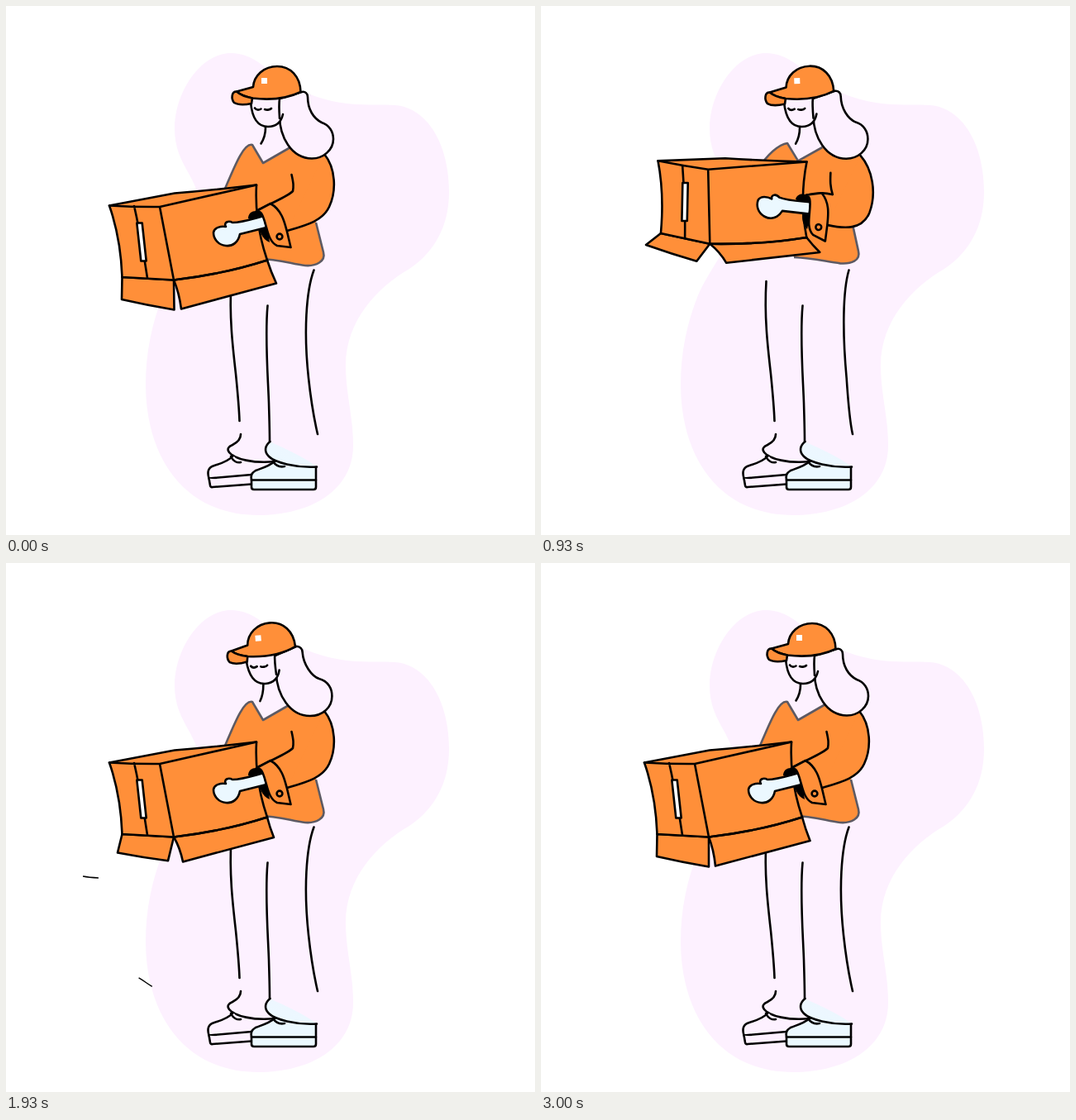
Animation, 640 px wide and 640 px high, one loop 3070 ms. Source, as an HTML page:

```html
<!DOCTYPE html>
<html lang="en">
<head>
<meta charset="utf-8">
<title>Carrying a box</title>
<style>
html, body { margin: 0; width: 100%; height: 100%; overflow: hidden; background: #fff; }
svg { display: block; width: 100vw; height: 100vh; }
.ink { stroke: #000; stroke-width: 2.6; stroke-linecap: round; stroke-linejoin: round; fill: none; }
.orange { fill: #ff8f39; }
.lilac { fill: #fdf1ff; }
.ice { fill: #ebf8ff; }
.gray { stroke: #5d5a63; stroke-linecap: butt; }
.wind { stroke: #000; stroke-width: 1.4; fill: none; }
</style>
</head>
<body>
<svg viewBox="0 0 640 640">
  <defs>
    <linearGradient id="hemTone" x1="0" y1="1" x2=".6" y2="0">
      <stop offset=".2" stop-color="#ebf8ff"/><stop offset="1" stop-color="#eef6ff"/>
    </linearGradient>
  </defs>
  <path class="lilac" d="M272 57C300 57 316 78 333 89C355 103 385 117 425 119C445 120 455 119 470 120C508 122 536 165 536 225C536 270 515 300 488 318C450 340 411 380 411 435C411 470 420 495 420 532C420 585 370 616 305 616C215 616 169 545 169 458C169 420 176 385 190 350C205 315 235 285 235 250C235 205 204 195 204 148C204 105 235 57 272 57Z"/>

  <g class="ink">
    <path d="M272.5 333C270 375 274 410 278 445C280.5 470 282 487 282.5 502"/>
    <path d="M316.5 362.5C313 400 317 450 318 480C318.6 500 319 515 319 527"/>
    <path id="leg"/>
    <path d="M284 518C284 524 280 528 274 531C269 533 267 536 270 540C276 548 300 554 326 551"/>
    <path class="lilac" d="M275 544C270 550 262 553 252 556C245 558 243 563 245.500 571.500L297 567"/>
    <path class="lilac" d="M245.500 571.500L247 580Q247.500 582.500 250 582L297 578.500"/>
    <path d="M272 545C275 551 280 553 284 552"/>
    <path fill="url(#hemTone)" stroke="none" d="M319.500 527C313 532 312 539 318 545C325 552 350 559 376 557.500C360 545 338 536 319.500 527Z"/>
    <path class="ice" d="M325 551C318 557 310 559 302 562C297 565 296 568 297 574L375 573.500V558C355 559 338 555 325 551" stroke="none"/>
    <path d="M325 551C318 557 310 559 302 562C297 565 296 568 297 573.500M375 573.500V558"/>
    <path d="M319.500 527C313 532 312 539 318 545C325 552 350 559 376 557.500"/>
    <path class="ice" d="M297 573.500V582Q297 585 300 585H372Q375 585 375 582V573.500Z"/>
    <path d="M323 551C327 557 332 558 337 557"/>
  </g>

  <path id="shirt" class="orange"/>
  <path id="collar" class="ink gray"/>
  <path id="side" class="ink gray"/>
  <path id="neck" class="ink"/>
  <path id="arm" class="ink orange"/>
  <path id="crease" class="ink"/>

  <g class="ink orange">
    <path id="leftFlap"/>
    <path id="rightFlap"/>
    <path id="box"/>
    <path id="edges" fill="none"/>
    <path id="slot" fill="#fff"/>
  </g>

  <g id="forearm" class="ink">
    <path d="M293 257C293 248 303 245 310 251C316 259 317 274 319 286C309 282 307 272 305 262Z" fill="#000" stroke="none"/>
    <path class="ice" d="M266 267C263 262 269 259 274 262C286 262 300 257 312 254L315 268L283 276C281 286 274 291 266 290C256 289 251 281 251 274C252 268 260 266 266 267Z"/>
    <path class="orange" d="M303 248L320 239C334 247 337 262 340 273L344.500 292L328 290C315 284 316 262 309 251Q307 248 303 248Z"/>
    <circle cx="331" cy="279" r="3.400"/>
  </g>

  <path id="hair" class="ink lilac"/>
  <g id="head" class="ink">
    <path class="lilac" d="M296 116C297 128 301 146 317 146C327 146 333 140 335 131" />
    <path d="M331 112C330 119 330.500 128 331 136"/>
    <path d="M301 123.500C303 126 306 126 308.500 124.500M313 125C315 126 319 126 321 124"/>
    <path class="orange" d="M279 103.500L299 98C300 84 312 73 328 73C344 73 356 85 356.500 104C340 112 318 114 298 111.500C290 110 284 108 279 103.500Z"/>
    <path class="orange" d="M279 103.500C273 103 272 112 276 117C281 120 290 119.500 297 118L298 111.500C290 110 284 108 279 103.500Z"/>
    <rect x="309" y="87" width="7" height="7" fill="#fff" stroke="none"/>
  </g>

  <path class="wind" d="M158 383C130 370 110 372 83 366" data-start="1115" data-speed=".25"/>
  <path class="wind" d="M172 400L149 388C125 377 105 385 79 375" data-start="1410" data-speed=".16"/>
  <path class="wind" d="M217 513C205 523 190 522 170 508S145 496 134 503S90 514 58 508" data-start="1532" data-speed=".157"/>
</svg>
<script>
const LOOP = 3070, FRAME = 1000 / 14, STREAK = 19;
const $ = id => document.getElementById(id);
const draw = (id, d) => $(id).setAttribute('d', d);
const lerp = (a, b, f) => a + (b - a) * f;

// Carrying poses, from lowest to highest.
const legs = [
  'M372.5 319.5C363 345 360 395 366 450C369 478 374 505 377 518',
  'M372.5 319.5C363 345 360 395 366 450C369 478 374 505 377 518',
  'M372.5 319.5C365 345 364 395 369 450C371 480 374 505 377 518',
  'M372.5 319.5C365 345 365 395 370 450C372 480 374 505 377 518'
];
const collars = [
  'M262 228C275 198 287 165 298 168L311 190L344 171',
  'M262 228C275 198 287 165 298 168L311 190L344 171',
  'M262 198C272 178 288 168 298 166L311 188L341 171',
  'M264 196C274 181 288 167 298 166L311 187L340 171'
];
const sides = [
  'M375 262L384 298C387 309 375 315 362 314C345 312 330 306 306 306',
  'M375 262L384 298C387 309 375 315 362 314C345 312 330 306 306 306',
  'M375 260L384 296C387 308 375 313 362 312C345 310 330 305 306 304',
  'M379 271L384 297C387 308 375 312 362 311C345 309 330 305 306 304'
];
const arms = [
  'M385 179C399 196 400 224 391 243C383 260 364 265 340 272',
  'M389 178C404 194 406 222 395 244C386 262 366 261 343 267',
  'M391 177C406 194 409 222 398 243C388 262 366 258 346 261',
  'M384 183C398 199 405 228 397 254C389 276 368 276 346 267'
];
const creases = [
  'M345.5 204C348 215 348 218 347 224C341 230 330 234 303 248',
  'M347 201C349 212 349 216 348 220C342 228 328 230 307 238',
  'M351 196C351.5 209 351 214 347 221C340 224 330 222 313 229',
  'M350 205C349 213 349 220 356 232C350 228 345 226 321 230'
];
// Corners: A back left, B back middle, C right, D front, E seam top,
// F bottom left, G bottom front, H bottom right, I seam bottom.
const corners = [
  '125 241.5 204 226.5 303 216.5 186 243 155 242 140.5 328 203 331.5 316 307.5 171 329',
  '130 220.5 210 209 309 204.5 191.5 225 160 222.5 141.5 307.5 203.5 314 317.5 296 171.5 310.5',
  '136 199 217 192 316 192 197 206.5 166 204 143 287 203 296.5 320 283.5 172.5 291',
  '144.5 181 226 180 324.5 186.5 205 193 174 187.5 146 268.5 205 283 322 278 175 275'
];
const slots = ['164 285.5 5', '167 266.5 4', '170.5 247 1', '176 231.5 -2'];
const grips = ['267 277 0', '270 263 7', '274 249 12.5', '278 240 25'];
const hairs = [
  'M331 112L358 104C362 103 365 106 365 110C365 125 372 136 382 141C391 144 396 152 396 161C396 174 384 184.5 370 184.5C345 184 331 158 331 133',
  'M326 112L352 101C356 101 359 104 359 108C360 123 370 137 379 140C390 143 394.5 152 394.5 161C394.5 175 383 185 368 185C344 185 328 160 327 133'
];
const necks = ['M314 147C314 155 312 161 308.5 166.5', 'M311.5 147C311.5 155 310 162 307.5 167'];

// Keys are [time, ...values].
const liftKeys = [[0, 0], [360, 1], [710, 2], [1140, 3], [1540, 0], [LOOP, 0]];
const headKeys = [[0, 0], [360, .3], [710, -.8], [1140, -2.4], [1570, -4.1], [1850, -4.4], [2290, -3.3], [3000, 0], [LOOP, 0]];
const flapKeys = [
  [0, -.5, 27, .5, 36, 9, 35, 11, 28],
  [360, -2, 27, -1.5, 36.5, 9, 35, 11, 29],
  [710, -9.5, 19, -8.5, 26.5, 17, 27, 13, 22],
  [920, -18, 14, -16, 21, 20, 23, 16, 18],
  [1140, -9, 23, -7.5, 30.5, 9, 33, 9, 27],
  [1570, -10.5, 18, -11, 23.5, 18, 25, 15, 19],
  [2290, -.5, 27, -1.5, 35.5, 4, 35, 1, 30],
  [3000, -.5, 27, 0, 36, 8, 35, 9.5, 28.5],
  [LOOP, -.5, 27, .5, 36, 9, 35, 11, 28]
];

// Smooth keyframes whose speed is zero at every turning point.
function sample(keys, t) {
  let i = 0;
  while (i < keys.length - 2 && t >= keys[i + 1][0]) i++;
  const [a, b] = [keys[i], keys[i + 1]], span = b[0] - a[0], f = (t - a[0]) / span;
  const slope = (n, k) => {
    const p = keys[n - 1], c = keys[n], q = keys[n + 1];
    if (!p || !q || (c[k] - p[k]) * (q[k] - c[k]) <= 0) return 0;
    return (q[k] - p[k]) / (q[0] - p[0]);
  };
  return a.slice(1).map((v, n) => {
    const k = n + 1, m0 = slope(i, k) * span, m1 = slope(i + 1, k) * span;
    const s = f * f * (3 - 2 * f);
    return lerp(v, b[k], s) + m0 * f * (1 - f) ** 2 - m1 * f * f * (1 - f);
  });
}

const NUMBER = /-?[\d.]+/g;
function morph(poses, u) {
  const i = Math.max(0, Math.min(Math.floor(u), poses.length - 2));
  const next = poses[i + 1].match(NUMBER);
  let n = 0;
  return poses[i].replace(NUMBER, v => lerp(+v, +next[n++], u - i).toFixed(2));
}
const numbers = text => text.match(NUMBER).map(Number);

function bend(p, q, dx, dy) {
  return `Q${(p[0] + q[0]) / 2 + dx} ${(p[1] + q[1]) / 2 + dy} ${q}`;
}

function drawBox(u, t) {
  const v = numbers(morph(corners, u));
  const [A, B, C, D, E, F, G, H, I] = Array.from({ length: 9 }, (_, i) => [v[2 * i], v[2 * i + 1]]);
  const o = sample(flapKeys, t);
  const tip = (p, i) => [p[0] + o[i], p[1] + o[i + 1]];
  const [l0, l1, r0, r1] = [tip(F, 0), tip(G, 2), tip(G, 4), tip(H, 6)];
  const front = bend(G, H, 4, 5);
  draw('leftFlap', `M${F}L${l0}${bend(l0, l1, 0, 1)}L${G}Z`);
  draw('rightFlap', `M${G}${bend(G, r0, 2, -2)}L${r1}${bend(r1, H, -1, 0)}Z`);
  draw('box', `M${A}L${B}${bend(B, C, 0, 1)}${bend(C, H, -9, 0)}${bend(H, G, 4, 5)}L${F}${bend(F, A, 6, -4)}Z`);
  draw('edges', `M${A}${bend(A, D, 0, 1)}L${C}M${D}L${G}${front}M${E}${bend(E, I, 2, 0)}`);
  const [x, y, lean] = numbers(morph(slots, u));
  const corner = (sx, sy) => `${x + sx * 3.2 + sy * lean / 2} ${y + sy * 23}`;
  draw('slot', `M${corner(-1, -1)}L${corner(1, -1)}L${corner(1, 1)}L${corner(-1, 1)}Z`);
}

function render(t) {
  const [u] = sample(liftKeys, t);
  const [tilt] = sample(headKeys, t);
  const nod = -tilt / 4.1;
  const collar = morph(collars, u), side = morph(sides, u);

  draw('leg', morph(legs, u));
  draw('collar', collar);
  draw('side', side);
  draw('shirt', `${collar}L388 182${side.replace('M', 'L')}Z`);
  draw('arm', morph(arms, u));
  draw('crease', morph(creases, u));
  drawBox(u, t);

  const [x, y, turn] = numbers(morph(grips, u));
  $('forearm').setAttribute('transform', `translate(${x} ${y}) rotate(${turn}) translate(-267 -277)`);
  draw('hair', morph(hairs, nod));
  draw('neck', morph(necks, nod));
  $('head').setAttribute('transform', `rotate(${tilt} 315 188)`);

  for (const line of document.querySelectorAll('.wind')) {
    const head = (t - line.dataset.start) * line.dataset.speed;
    line.style.visibility = head > 0 && head < line.getTotalLength() + STREAK ? 'visible' : 'hidden';
    line.setAttribute('stroke-dasharray', `${STREAK} 999`);
    line.setAttribute('stroke-dashoffset', STREAK - head);
  }
}

const start = performance.now();
function tick() {
  const t = (performance.now() - start) % LOOP;
  render(Math.min(42, Math.floor((t + 5) / FRAME)) * FRAME);
  requestAnimationFrame(tick);
}
tick();
</script>
</body>
</html>
```
